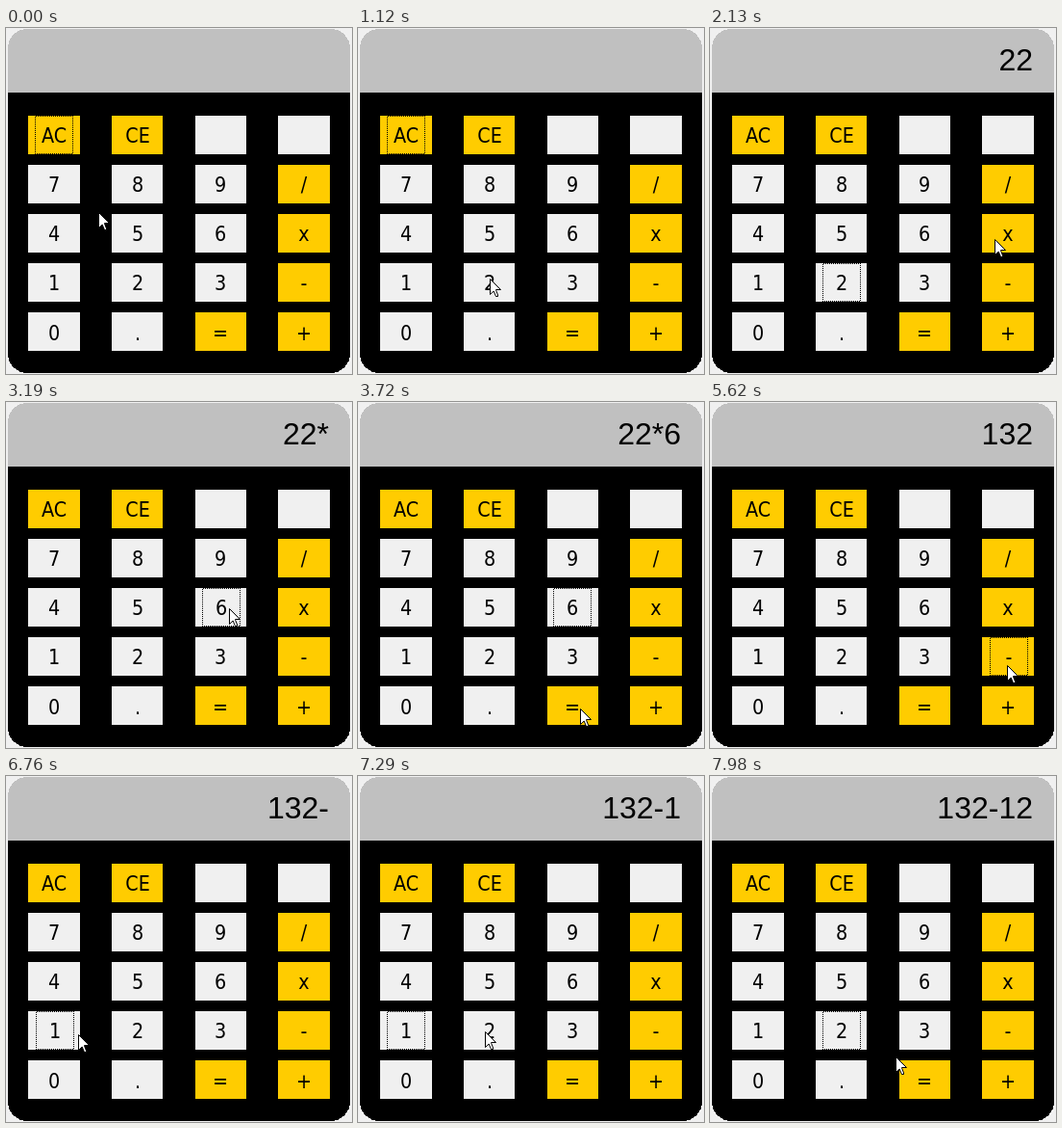
These frames come from a looping animation (360 by 359 pixels, 8 s). An HTML page:

```html
<!DOCTYPE html>
<html lang="en">
<head>
<meta charset="utf-8">
<title>Calculator</title>
<style>
  html, body { margin: 0; width: 100%; height: 100%; overflow: hidden; background: #f0f0f0; }
  svg { display: block; width: 360px; height: 359px; }
  .shell { shape-rendering: crispEdges; }
  .label { font: 21.33px "DejaVu Sans Condensed", "DejaVu Sans", sans-serif; font-stretch: 75%; text-anchor: middle; }
  #display { font: 32px "Liberation Sans", Arial, sans-serif; text-anchor: end; }
</style>
</head>
<body>
<svg viewBox="0 0 360 359">
  <pattern id="dots" width="2" height="2" patternUnits="userSpaceOnUse">
    <path d="M1 0h1v1h-1zM0 1h1v1h-1z"/>
  </pattern>
  <path class="shell" d="M2 67V21a20 20 0 0 1 20-20H338a20 20 0 0 1 20 20V67Z" fill="#c0c0c0"/>
  <path class="shell" d="M2 67V338a20 20 0 0 0 20 20H338a20 20 0 0 0 20-20V67Z"/>
  <text id="display" x="336" y="44"></text>
  <g id="keys"></g>
  <rect id="focus" x=".5" y=".5" width="39" height="39" fill="none" stroke="url(#dots)"/>
  <path id="cursor" d="M.5 .5V16.5L4.2 13L6.5 18.5H8.5V17L6.6 12.2V11.5H11.5Z" fill="#fff" stroke="#000"/>
</svg>
<script>
const LOOP = 8000, HOLD = 210, STEP = 60;
const $ = id => document.getElementById(id);
const keys = {};

function add(tag, attrs, text = '') {
  const node = document.createElementNS('http://www.w3.org/2000/svg', tag);
  for (const name in attrs) node.setAttribute(name, attrs[name]);
  node.textContent = text;
  return $('keys').appendChild(node);
}

function addKey(name, row, column) {
  const left = 86.8 * column, y = 91 + 51 * row;
  const x = Math.round(23 + left), width = Math.round(76.6 + left) - x;
  const fill = /^(AC|CE|[/x=+-])$/.test(name) ? '#ffcc00' : '#f0f0f0';
  add('rect', { x, y, width, height: 40, fill });
  const inner = Math.floor(30.2 + left);
  const label = add('text', { class: 'label', x: inner + 20, y: Math.floor(119 + 51.25 * row) }, name);
  keys[name] = { label, x: inner, y };
}

['AC,CE,,', '7,8,9,/', '4,5,6,x', '1,2,3,-', '0,.,=,+'].forEach((line, row) =>
  line.split(',').forEach((name, column) => addKey(name, row, column)));

const clicks = [];
const click = (press, key) => clicks.push({ press, key });

const home = [96, 191], moves = [];
const move = (start, steps, to, bend) => moves.push({ start, steps, to, bend });

move(750, 7, [137, 260], [52, 228]);
click(1340, '2');
click(1450, '2');
move(1870, 6, [309, 216]);
click(2390, 'x');
move(2670, 5, [232, 214]);
click(3190, '6');
move(3460, 5, [231, 318]);
click(3970, '=');
move(4590, 8, [309, 273], [260, 318]);
click(5430, '-');
move(5770, 7, [75, 268]);
click(6760, '1');
move(7110, 4, [132, 265]);
click(7520, '2');
move(7910, 2, [193, 291]);

function type(text, key) {
  if (key !== '=') return text + (key === 'x' ? '*' : key);
  const [a, b] = text.split('*');
  return String(a * b);
}

function padAt(time) {
  const pad = { key: 'AC', pressed: 0, text: '' };
  clicks.forEach(({ press, key }, i) => {
    if (time < press) return;
    const release = Math.min(press + HOLD, clicks[i + 1]?.press ?? LOOP);
    pad.key = key;
    pad.pressed = time < release ? 1 : 0;
    if (!pad.pressed) pad.text = type(pad.text, key);
  });
  return pad;
}

function cursorAt(time) {
  let at = home;
  for (const { start, steps, to, bend } of moves) {
    if (time < start) break;
    const p = Math.min(1, (1 + Math.floor((time - start) / STEP)) / steps);
    const t = p * p * (3 - 2 * p);
    at = at.map((a, i) => {
      const middle = bend ? bend[i] : (a + to[i]) / 2;
      return Math.round((1 - t) ** 2 * a + 2 * t * (1 - t) * middle + t * t * to[i]);
    });
  }
  return at;
}

function place(node, x, y) {
  node.setAttribute('transform', `translate(${x} ${y})`);
}

function draw(time) {
  const { key, pressed, text } = padAt(time);
  for (const name in keys) place(keys[name].label, name === key ? pressed : 0, 0);
  place($('focus'), keys[key].x + pressed, keys[key].y);
  place($('cursor'), ...cursorAt(time));
  $('display').textContent = text;
}

const origin = performance.now();
function tick() {
  draw((performance.now() - origin) % LOOP);
  requestAnimationFrame(tick);
}
tick();
</script>
</body>
</html>
```
